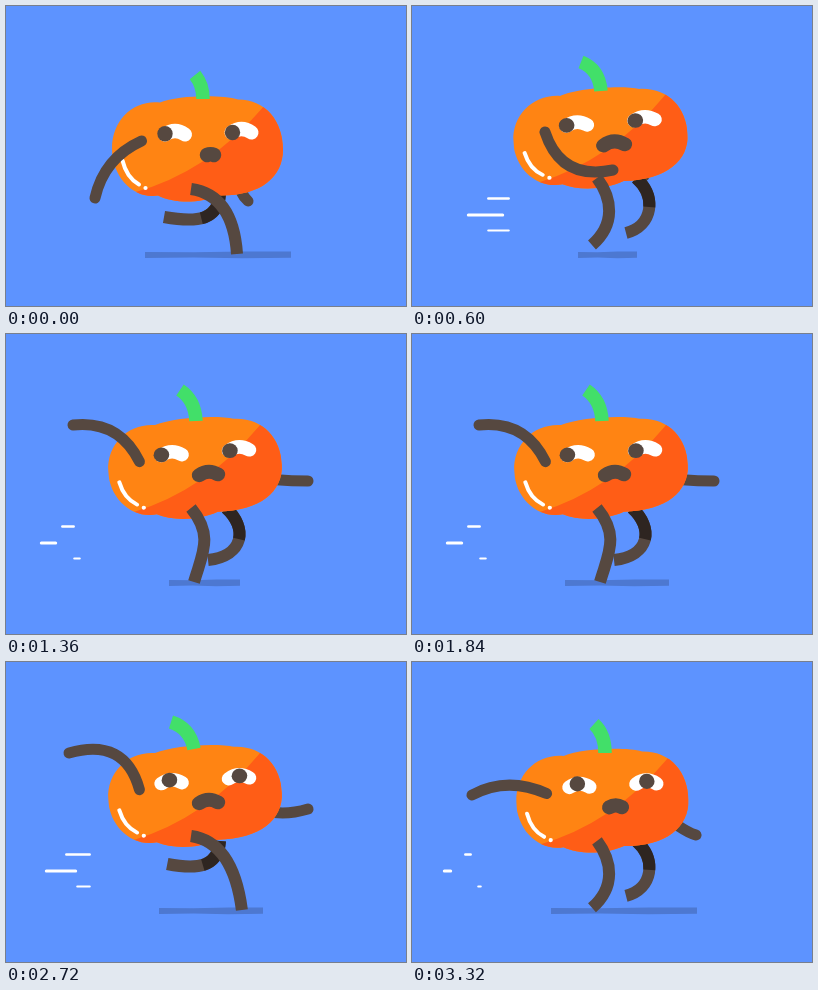
These frames come from a looping animation (400x300 px, 3360 ms). An HTML page:

```html
<!DOCTYPE html>
<html lang="en">
<head>
<meta charset="utf-8">
<title>Running pumpkin</title>
<style>
  html, body { margin: 0; height: 100%; overflow: hidden; background: #5d93ff; }
  svg { display: block; width: 100%; height: 100%; }
  path { fill: none; }
  .limb { stroke: #564840; stroke-width: 12; }
  .arm { stroke-width: 11; stroke-linecap: round; }
  .dark { stroke: #2e2521; }
  .white { stroke: #fff; stroke-linecap: round; }
</style>
</head>
<body>
<svg viewBox="0 0 400 300">
  <clipPath id="skin">
    <path id="outline" d="M-86 -1C-86 -30 -64 -50 -38 -47C-20 -54.5 24 -55 40 -50C68 -50 85 -28 85 0C85 28 62 47 20 46C2 54 -24 54 -40 46C-64 50 -86 28 -86 -1Z"/>
  </clipPath>
  <path id="shadow" style="fill:#4d78d1"/>
  <path id="line0" class="white" stroke-width="2.4"/>
  <path id="line1" class="white" stroke-width="3"/>
  <path id="line2" class="white" stroke-width="2.2"/>
  <path id="farArm" class="limb arm"/>
  <path id="farLeg" class="limb"/>
  <path id="farThigh" class="limb dark" pathLength="1" stroke-dasharray=".47 1"/>
  <g id="body">
    <g clip-path="url(#skin)">
      <rect x="-100" y="-70" width="200" height="140" fill="#ff8413"/>
      <path d="M63 -40Q9 23 -64 43L-62 80H110V-60H80Z" style="fill:#ff5d16"/>
    </g>
    <path class="white" d="M-75.5 11Q-71.5 28 -59 35" stroke-width="4"/>
    <circle cx="-52.5" cy="38.5" r="2.1" fill="#fff"/>
    <path class="white" d="M-33 -15Q-23 -22 -13 -15M33.5 -17Q43.5 -24 53.5 -17" stroke-width="14"/>
    <g fill="#564840">
      <circle id="leftPupil" r="7.7"/>
      <circle id="rightPupil" r="7.7"/>
    </g>
    <path id="mouth" class="limb" style="stroke-width:14.5;stroke-linecap:round"/>
  </g>
  <path id="stem" stroke="#42df69" stroke-width="13.5"/>
  <path id="nearLeg" class="limb"/>
  <path id="nearArm" class="limb arm"/>
</svg>
<script>
const LOOP = 3360, TICK = 40;
const el = id => document.getElementById(id);
const draw = (id, d) => el(id).setAttribute('d', d);
const move = (id, x, y) => el(id).setAttribute('transform', `translate(${x} ${y})`);
const clamp = v => Math.max(0, Math.min(1, v));
const mix = (a, b, p) => a + (b - a) * p;

// Stem over one bob: tip, control point, base
const stems = [
  'M189 69Q197 79 197 93', 'M162 70Q183 71 190 91', 'M165 60Q184 66 188 87',
  'M169 56Q187 63 189 85', 'M174 56Q189 66 190 87', 'M182 62Q193 72 193 91'
];

// Arms over one full swing: control point and hand
const nearArms = [
  '98 152 89 192', '118 172 146 190', '135 170 188 173', '149 175 201 164',
  '135 170 188 173', '116 168 138 191', '94 132 66 174', '92 83 54 138',
  '119 75 63 91', '116 72 67 79', '113 86 67 91', '95 114 60 133'
];
const hidden = '235 160 232 170';
const farArms = [
  '225 180 242 195', hidden, hidden, hidden, hidden, hidden,
  '238 182 258 188', '260 177 284 173', '268 157 302 147',
  '270 149 306 137', '268 147 302 147', '268 168 284 173'
];

// Legs over one step; y is the hip height, k the lift of the body
const steps = [
  (y, k) => [`Q227 ${y + 6} ${231 + 6 * k} 248`,
    `M214 ${y + 5}C212 ${y + 31} 192 ${y + 34} ${158 + 4 * k} ${y + 28}`],
  y => [`C212 ${y + 19} 214 222 210 248`,
    `M222 ${y + 3}C232 ${y + 24} 215 ${y + 42} 182 ${y + 41}`],
  y => [`C208 ${y + 28} 196 220 188 248`,
    `M220 ${y}C242 ${y + 20} 238 ${y + 48} 202 ${y + 52}`],
  y => [`C200 ${y + 20} 204 ${y + 46} 180 ${y + 67}`,
    `M224 ${y}C245 ${y + 18} 241 ${y + 48} 214 ${y + 55}`]
];
const hop = y => [`C214 ${y + 17} 224 ${y + 43} 188 ${y + 57}`,
  `M216 ${y}C232 ${y + 20} 226 ${y + 40} 206 ${y + 54}`];

// Speed lines: height, left ends, right ends at the times below
const lineTimes = [1, 3, 7, 8, 10, 11, 12];
const lines = [
  [192.5, [92, 75, 61, 59, 55, 52, 50], [101, 98, 90, 85, 69, 60, 50]],
  [209, [76, 55, 41, 39, 34, 31, 30], [97, 92, 78, 71, 51, 40, 30]],
  [224.5, [89, 75, 71, 70, 67, 65, 64], [101, 98, 89, 85, 75, 70, 64]]
];
function sample(values, f) {
  const i = Math.max(1, lineTimes.findIndex(t => t >= f));
  return mix(values[i - 1], values[i],
    (f - lineTimes[i - 1]) / (lineTimes[i] - lineTimes[i - 1]));
}

const shadowSpans = [[166, 225], [163, 234], [153, 257], [139, 285]];
const shadowOrder = '32102012210123';

function render(t) {
  const n = Math.floor(t / TICK), f = n % 12;
  const k = Math.abs(Math.sin(n * Math.PI / 6)) ** 1.4;

  const [x0, x1] = shadowSpans[shadowOrder[Math.floor(n / 3) % 14]];
  const third = (x1 - x0) / 3;
  draw('shadow', `M${x0} 246L${x0 + third} 246.3 ${x0 + 2 * third} 245.6 ${x1} 245.5` +
    `V251.7L${x0 + 2 * third} 252.2 ${x0 + third} 251.6 ${x0} 251.9Z`);

  lines.forEach(([y, left, right], i) =>
    draw('line' + i, f ? `M${sample(left, f) + 1.3} ${y}H${sample(right, f) - 1.3}` : ''));

  el('body').setAttribute('transform',
    `translate(${192 - 3 * k} ${143.5 - 11 * k}) rotate(${-3 * k}) scale(${1 + .02 * k} ${1 - .05 * k})`);
  draw('stem', stems[n % 6]);

  const w = 3.5 + 7 * k, arch = 1 + 4 * k;
  draw('mouth', `M${12.5 - w} ${5 + arch / 2}Q12.5 ${5 - arch} ${12.5 + w} ${5 + arch / 2}`);

  const look = clamp((t - 2400) / 120);
  move('leftPupil', mix(-33, -25, look), mix(-15.7, -18.3, look));
  move('rightPupil', mix(34.5, 44, look), mix(-17, -19.5, look));

  const y = 183 - 11 * k;
  const [near, far] = (f === 7 ? hop : steps[f % 4])(y, k);
  draw('nearLeg', `M185 ${y}` + near);
  draw('farLeg', far);
  draw('farThigh', far);
  draw('nearArm', `M${135.5 - 2.5 * k} ${135 - 9 * k}Q${nearArms[f]}`);
  draw('farArm', `M245 ${150 - 10 * k}Q${farArms[f]}`);
}

const start = performance.now();
function loop() {
  render((performance.now() - start) % LOOP);
  requestAnimationFrame(loop);
}
loop();
</script>
</body>
</html>
```
